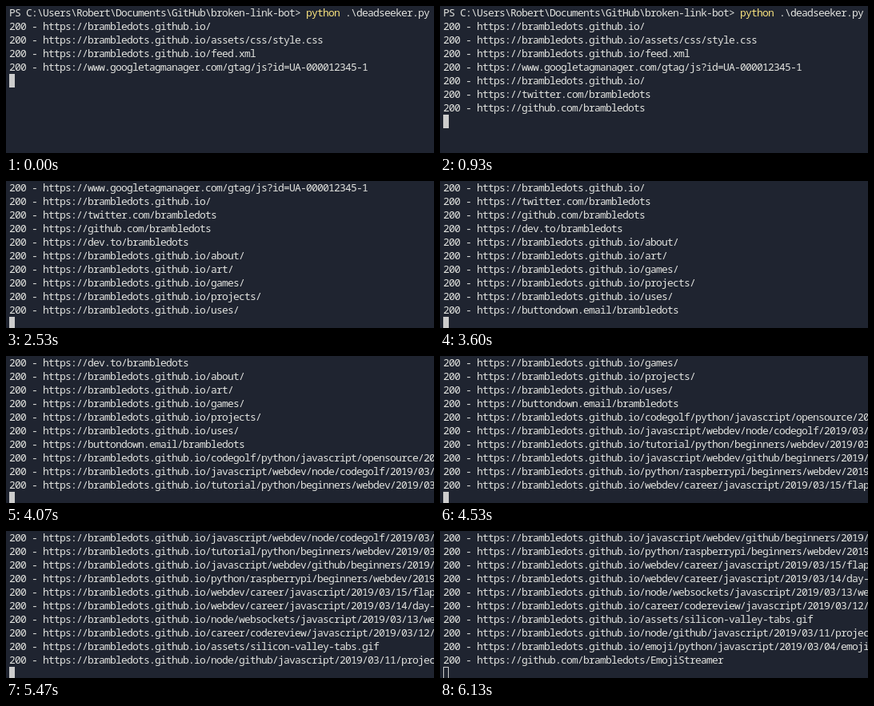
An HTML page that plays this animation: 535x184 px, repeating every 6.19 s.

```html
<!DOCTYPE html>
<html lang="en">
<head>
<meta charset="utf-8">
<title>Link checker terminal</title>
<style>
  html, body { margin: 0; width: 100%; height: 100%; overflow: hidden; background: #1f2430; }
  svg { display: block; width: 535px; height: 184px; overflow: hidden; }
  text {
    font: 13px "Noto Sans Mono", "DejaVu Sans Mono", monospace;
    letter-spacing: -0.8px;
    font-variant-ligatures: none;
    fill: #e2e3df;
    white-space: pre;
  }
  .cmd { fill: #f8e27e; }
  .cursor { fill: #cccccc; }
  .cursor.hollow { fill: none; stroke: #cccccc; }
</style>
</head>
<body>
<svg id="screen" viewBox="0 0 535 184"></svg>
<script>
const LOOP = 6190, ROW = 17, LEFT = 4, BASELINE = 13, ROWS = 10;
const FIRST_LINES = 5, BLUR_AT = 6130;
const USER = "brambledots";
const SITE = USER + ".github.io/";

const prompt = String.raw`PS C:\Users\Robert\Documents\GitHub\broken-link-bot> `;
const script = String.raw` .\deadseeker.py`;

const pages = list => list.map(path => SITE + path);
const urls = [
  ...pages(["", "assets/css/style.css", "feed.xml"]),
  "www.googletagmanager.com/gtag/js?id=UA-000012345-1",
  SITE,
  "twitter.com/" + USER,
  "github.com/" + USER,
  "dev.to/" + USER,
  ...pages(["about/", "art/", "games/", "projects/", "uses/"]),
  "buttondown.email/" + USER,
  ...pages([
    "codegolf/python/javascript/opensource/2019/",
    "javascript/webdev/node/codegolf/2019/03/",
    "tutorial/python/beginners/webdev/2019/03/",
    "javascript/webdev/github/beginners/2019/",
    "python/raspberrypi/beginners/webdev/2019/",
    "webdev/career/javascript/2019/03/15/flap",
    "webdev/career/javascript/2019/03/14/day-",
    "node/websockets/javascript/2019/03/13/we",
    "career/codereview/javascript/2019/03/12/",
    "assets/silicon-valley-tabs.gif",
    "node/github/javascript/2019/03/11/projec",
    "emoji/python/javascript/2019/03/04/emoji"
  ]),
  "github.com/" + USER + "/EmojiStreamer"
];

// When each further line is printed
const printTimes = [
  70, 400, 930, 1800, 1930, 2070, 2270, 2400, 2530, 3600, 3800, 3930,
  4070, 4270, 4400, 4530, 4730, 4870, 5000, 5330, 5470, 5670, 6130
];

const screen = document.getElementById("screen");

function add(tag, attrs, parent = screen) {
  const el = document.createElementNS("http://www.w3.org/2000/svg", tag);
  for (const key in attrs) el.setAttribute(key, attrs[key]);
  parent.appendChild(el);
  return el;
}

function addLine(parts) {
  const line = add("text", { x: LEFT });
  for (const [content, cls] of parts) {
    add("tspan", { class: cls }, line).textContent = content;
  }
  return line;
}

const lines = [
  addLine([[prompt, ""], ["python", "cmd"], [script, ""]]),
  ...urls.map(url => addLine([["200 - https://" + url, ""]]))
];
const cursor = add("rect", {});

function placeCursor(row, hollow) {
  const inset = hollow ? 0.5 : 0;
  cursor.setAttribute("class", hollow ? "cursor hollow" : "cursor");
  cursor.setAttribute("x", LEFT + inset);
  cursor.setAttribute("y", row * ROW + inset);
  cursor.setAttribute("width", 7 - 2 * inset);
  cursor.setAttribute("height", ROW - 2 * inset);
}

let shown = "";

function draw(t) {
  const count = FIRST_LINES + printTimes.filter(at => at <= t).length;
  const hollow = t >= BLUR_AT;
  const state = count + "/" + hollow;
  if (state === shown) return;
  shown = state;

  const top = Math.max(0, count - ROWS);
  lines.forEach((line, i) => {
    const visible = i >= top && i < count;
    line.setAttribute("display", visible ? "inline" : "none");
    line.setAttribute("y", (i - top) * ROW + BASELINE);
  });
  placeCursor(count - top, hollow);
}

const start = performance.now();

function tick() {
  draw((performance.now() - start) % LOOP);
  requestAnimationFrame(tick);
}
tick();
</script>
</body>
</html>
```
